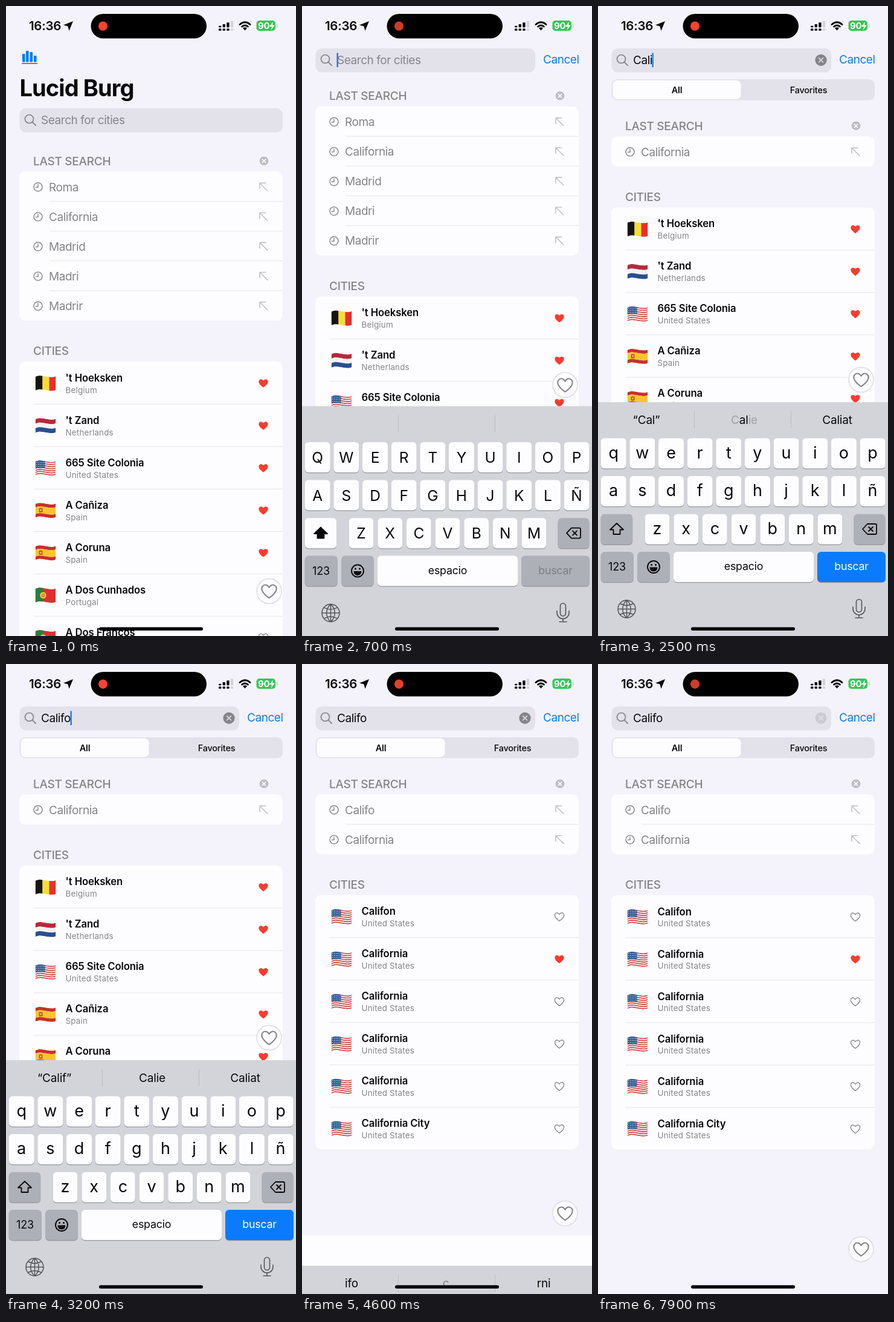
An HTML page that plays this animation: 480 px wide and 1040 px high, repeating every 8000 ms.

```html
<!DOCTYPE html>
<html lang="en">
<head>
<meta charset="utf-8">
<title>City search</title>
<style>
  html, body { margin: 0; width: 100%; height: 100%; overflow: hidden; background: #f4f3fb; }
  svg { display: block; width: 100%; height: 100%; }
  text { font-family: Inter, "Open Sans", sans-serif; white-space: pre; }
</style>
</head>
<body>
<svg viewBox="0 0 480 1040"><defs id="defs"></defs><g id="screen"></g></svg>
<script>
const INK = '#08080a', MUTED = '#858489', PAGE = '#f4f3fb', FIELD = '#e3e2eb', CARD = '#fdfdff',
  LINE = '#e6e6ea', BLUE = '#0a7bf5', RED = '#fb3b30', PALE = '#bdbcc2', BOARD = '#d3d4da', GREY = '#aeb0b8';
const HEART = 'M0 7C-9 1-8-3.5-7-4.8C-5-7.5-1.5-6.8 0-3.8C1.5-6.8 5-7.5 7-4.8C8-3.5 9 1 0 7Z';
const LOOP = 8000, STEP = 100;
const FOCUS = .37, SUBMIT = 4.2, DISMISS = 4.4;

const $ = id => document.getElementById(id);
const clamp = v => Math.max(0, Math.min(1, v));
const mix = (a, b, p) => a + (b - a) * p;
const spring = s => s <= 0 ? 0 : 1 - (1 + 18.26 * s) * Math.exp(-18.26 * s);
const smooth = v => (v = clamp(v), v * v * (3 - 2 * v));
const times = (n, f) => Array.from({ length: n }, (_, i) => f(i)).join('');

const rect = (x, y, w, h, fill, r = 0) =>
  `<rect x="${x}" y="${y}" width="${w}" height="${h}" rx="${r}" fill="${fill}"/>`;
const circle = (x, y, r, fill) => `<circle cx="${x}" cy="${y}" r="${r}" fill="${fill}"/>`;
const ring = (x, y, r, color, w, fill = 'none') =>
  `<circle cx="${x}" cy="${y}" r="${r}" fill="${fill}" stroke="${color}" stroke-width="${w}"/>`;
const shape = (d, fill) => `<path d="${d}" fill="${fill}"/>`;
const stroke = (d, color, w = 1.4, fill = 'none') =>
  `<path d="${d}" fill="${fill}" stroke="${color}" stroke-width="${w}" stroke-linecap="round" stroke-linejoin="round"/>`;
const at = (x, y, body, scale = 1) => `<g transform="translate(${x} ${y}) scale(${scale})">${body}</g>`;
const fade = (o, body) => o <= 0 ? '' : `<g opacity="${clamp(o)}">${body}</g>`;
const label = (x, y, s, size, fill = INK, weight = 400, space = 0, anchor = 'start', extra = '') =>
  `<text x="${x}" y="${y}" font-size="${size}" fill="${fill}" font-weight="${weight}" letter-spacing="${space}" text-anchor="${anchor}" ${extra}>${s}</text>`;
const body = (x, y, s, fill, extra) => label(x, y, s, 19, fill, 400, -.45, 'start', extra);
const mid = (x, y, s, size, fill = INK, weight = 400, space = -.2) =>
  label(x, y, s, size, fill, weight, space, 'middle');
const cross = (x, y, r, fill, ink) => {
  const d = r * .36;
  return at(x, y, circle(0, 0, r, fill) + stroke(`M${-d} ${-d}L${d} ${d}M${d} ${-d}L${-d} ${d}`, ink, 1.6));
};

// Waving flags, centred on 0,0
const wave = (a, b) => `M-17 ${a}C-6 ${a - 6} 5 ${a + 4} 17 ${a - 1}V${b - 1}C5 ${b + 4} -6 ${b - 6} -17 ${b}Z`;
function bands(colors, shares = colors.map(() => 1)) {
  const unit = 22.5 / shares.reduce((a, b) => a + b);
  let y = -10.5;
  return colors.map((c, i) => shape(wave(y, y += shares[i] * unit), c)).join('');
}
const flags = {
  be: rect(-17, -15, 12, 30, '#151413') + rect(-5, -15, 11, 30, '#fbdc35') + rect(6, -15, 12, 30, '#e5302f'),
  nl: bands(['#b7293a', '#f4f3f2', '#28508f']),
  us: bands(Array.from({ length: 13 }, (_, i) => i % 2 ? '#f6f1ee' : '#cf3b3a')) +
    rect(-17, -15, 16, 15, '#2f5b93') +
    times(15, i => circle(-15 + i % 5 * 3, -9.5 + Math.floor(i / 5) * 3.4, .65, '#fff')),
  es: bands(['#c8302b', '#fac52e', '#c8302b'], [1, 2, 1]) +
    rect(-11, -4, 6, 7, '#b5532b', 1.5) + rect(-9.5, -2, 3, 3, '#e5b46c'),
  pt: bands(['#dc3030']) + rect(-17, -15, 13, 30, '#2b7d3c') +
    circle(-4, 0, 5.2, '#f2d33b') + rect(-6.3, -2.8, 4.6, 5.6, '#d13a33', 1.5) + rect(-5, -1.4, 2, 2.5, '#fff')
};
$('defs').innerHTML = `<clipPath id="wave"><path d="${wave(-10.5, 12)}"/></clipPath>` +
  Object.entries(flags).map(([k, v]) => `<g id="${k}" clip-path="url(#wave)">${v}</g>`).join('');

// name, country, flag, favourite
const allCities = [
  ["'t Hoeksken", 'Belgium', 'be', 1], ["'t Zand", 'Netherlands', 'nl', 1],
  ['665 Site Colonia', 'United States', 'us', 1], ['A Cañiza', 'Spain', 'es', 1],
  ['A Coruna', 'Spain', 'es', 1], ['A Dos Cunhados', 'Portugal', 'pt', 0],
  ['A Dos Francos', 'Portugal', 'pt', 0]
];
const found = ['Califon', 'California', 'California', 'California', 'California', 'California City']
  .map((name, i) => [name, 'United States', 'us', i === 1]);

const keyTimes = [1.3, 1.6, 2, 2.4, 2.8, 3.1];
const typed = t => 'Califo'.slice(0, keyTimes.filter(k => k <= t).length);

function statusBar(t) {
  const dim = clamp(1 - Math.abs((t + 1.1) % 3.6 - 1.8) / .6);
  const signal = times(4, i => {
    const c = i < 3 ? INK : '#d4d3d9', h = 2.5 + i * 2.7, x = 352 + i * 6.6;
    return rect(x, 35.2 - h, 4.4, h, c, 1) + rect(x, 37.2, 4.4, 3.6, c, 1);
  });
  return label(38, 40, '16:36', 20.5, INK, 600, -.3) +
    shape('M111 25L104.5 41L102.5 33.5L95 31.5Z', INK) +
    rect(140.5, 13, 191.5, 40.5, '#000', 20.2) +
    circle(160.5, 33.2, 7.6, `rgb(${250 - 42 * dim},${66 - 6 * dim},${48 - 10 * dim})`) + signal +
    stroke('M387 30.5Q395.5 23 404 30.5M390.500 34Q395.5 30 400.5 34', INK, 2.8) +
    shape('M392 36.5Q395.5 34 399 36.5L395.5 40.5Z', INK) +
    rect(414.5, 24, 31.5, 17, '#35c759', 5) + rect(447.5, 29.5, 2, 6, '#b4dcc0', 1) +
    label(417, 38, '90', 15, '#fff', 700, -.3) + shape('M442 26L436 34H440L438.5 40L445 31.5H441Z', '#fff');
}

function header(t, p, text) {
  const y = mix(169, 70, p), w = mix(435.5, 363.5, p);
  const icon = [[27, 79], [33, 74], [39.5, 76], [46, 82]]
    .map(([x, top]) => rect(x, top, 4.6, 92.5 - top, BLUE, 1)).join('') + rect(26, 94, 26, 1.6, BLUE);
  const big = at(0, -107 * p, icon + label(22.5, 149, 'Lucid Burg', 38, INK, 700, -.9));
  let out = fade(1 - 2 * p, big) + rect(22.5, y, w, 39.5, FIELD, 10) +
    at(0, y, ring(38.5, 17.5, 7, MUTED, 1.7) + stroke('M43.7 22.7L49 28', MUTED, 1.8)) +
    (text ? body(58, y + 26.2, text, INK, 'id="typed"') : body(58, y + 26.2, 'Search for cities', MUTED));
  if (text) out += cross(369, 89.3, 9.6, t >= 7.8 ? '#cccbd3' : MUTED, FIELD);
  if (t >= .6 && t < 4.3) out += '<rect id="cursor" x="57.5" y="77.5" width="2.4" height="23.5" fill="#1a78f0"/>';
  return out + fade(p, body(mix(470, 399, p), 95.2, 'Cancel', BLUE));
}

function scopeBar(p) {
  return fade(p, rect(22.5, 121, 435.5, 34.5, FIELD, 9) + rect(24.5, 122.7, 212, 31, CARD, 7.5) +
    mid(130.5, 143.5, 'All', 14.5, INK, 600) + mid(348.5, 143.5, 'Favorites', 14.5, INK, 500));
}

const heading = (y, s) => label(45, y + 6.8, s, 19, MUTED, 500, -.28);

function recentRow(y, name) {
  return ring(53, y, 7, MUTED, 1.4) +
    stroke(`M53 ${y - 4.3}V${y + .5}H49.3`, MUTED) + body(71, y + 6.7, name, MUTED) +
    stroke(`M433 ${y + 6.5}L420 ${y - 6.5}M420 ${y + 3}V${y - 6.5}H430`, PALE);
}

function cityRow(y, [name, country, flag, liked], last) {
  return at(65.5, y + 36, `<use href="#${flag}"/>`) +
    label(98.5, y + 33, name, 16.7, INK, 600, -.12) +
    label(98.5, y + 51.8, country, 13.4, MUTED, 400, .2) +
    at(426, y + 36, liked ? shape(HEART, RED) : stroke(HEART, MUTED, 1.3)) +
    (last ? '' : rect(45, y + 70, 413, 1, LINE));
}

function lists(t, p, scope) {
  const y = 256 - 107.5 * p + 49.5 * scope;
  const recents = t < keyTimes[0] ? ['Roma', 'California', 'Madrid', 'Madri', 'Madrir']
    : t < SUBMIT ? ['California'] : ['Califo', 'California'];
  const count = 5 - 4 * scope + spring(t - SUBMIT);
  const top = y + 17, cityY = top + 49.1 * count + 51;
  const cities = t < 3.5 ? allCities : found;
  return heading(y, 'LAST SEARCH') + cross(427, y - .3, 7.3, PALE, CARD) +
    rect(22, top, 436, 49.1 * count + 1, CARD, 10) +
    recents.map((r, i) => fade(i ? count - i : 1, recentRow(top + 25.8 + i * 49.1, r) +
      (i ? rect(72, top + i * 49.1, 386, 1, LINE) : ''))).join('') +
    heading(cityY, 'CITIES') +
    rect(22, cityY + 17.3, 436, cities === found ? 420 : 560, CARD, 10) +
    cities.map((c, i) => cityRow(cityY + 17.3 + i * 70, c, cities === found && i === 5)).join('');
}

const fab = y => ring(435.5, y, 20.5, '#e1e0e7', 1.8, CARD) + at(435.5, y, stroke(HEART, MUTED, 1.25), 1.6);

const key = (x, y, w, fill) => rect(x, y + 1.3, w, 50, '#96979e', 6) + rect(x, y, w, 50, fill, 6);

function suggestions(t) {
  const quoted = typed(t - .2);
  if (t >= 4.5) return mid(82, 35.5, 'ifo', 19) + fade(.4, mid(238, 35.5, 'c', 19)) + mid(400, 35.5, 'rni', 19);
  let out = quoted ? mid(80, 35.5, `“${quoted}”`, 19) : '';
  if (t >= 3.4) out += mid(240, 35.5, 'Cálido', 19) + mid(400, 35.5, 'Californiana', 19);
  else if (t >= 2.4) {
    const soft = s => t < 2.6 ? `<tspan fill-opacity=".25">${s}</tspan>` : s;
    out += mid(242, 35.5, soft('C') + 'al' + soft('ie'), 19) + mid(396, 35.5, 'Caliat', 19);
  }
  return out;
}

function keyboard(t, top, text) {
  const upper = !text, size = upper ? 24.5 : 27, dark = '#53545a';
  const row = (letters, x, y, w) => [...letters].map((c, i) => key(x + i * 47.65, y, w, CARD) +
    mid(x + i * 47.65 + w / 2, y + (upper ? 34 : 33), upper ? c.toUpperCase() : c, size, INK, 400, 0)).join('');
  const letters = row('qwertyuiop', 4.7, 59.5, 42) + row('asdfghjklñ', 4.7, 122, 42) + row('zxcvbnm', 77.7, 184.7, 40.7);
  const shift = key(4.7, 184.7, 52.5, upper ? CARD : GREY) +
    stroke('M31 200L42 210.5H36.5V218H25.5V210.5H20Z', INK, 1.8, upper ? INK : 'none');
  const erase = key(423.5, 184.7, 52, GREY) +
    stroke('M446 201H459Q461 201 461 203V216Q461 218 459 218H446L438 209.5ZM448 206L455 213M455 206L448 213', INK, 1.8);
  const emoji = key(65.3, 247, 53.5, GREY) + ring(92, 272, 10, INK, 1.9) +
    circle(88.5, 268.5, 1.5, INK) + circle(95.5, 268.5, 1.5, INK) +
    shape('M85.5 272.5H98.5Q98 279.5 92 279.5Q86 279.5 85.5 272.5Z', INK);
  const globe = 'M-14.5 0A14.5 14.5 0 0 1 14.5 0A14.5 14.5 0 0 1-14.5 0ZH14.5M0-14.5V14.5' +
    'M0-14.5C-9-7-9 7 0 14.5C9 7 9-7 0-14.5M-11-9Q0-3 11-9M-11 9Q0 3 11 9';
  const mic = 'M-4.5-11A4.5 4.5 0 0 1 4.5-11V1A4.5 4.5 0 0 1-4.5 1ZM-10-3V0A10 10 0 0 0 10 0V-3M0 10V15M-6 15H6';
  return at(0, top, rect(0, 0, 480, 400, BOARD) +
    rect(159, 15, 1, 28, '#bdbec5') + rect(319, 15, 1, 28, '#bdbec5') + suggestions(t) +
    letters + shift + erase + key(4.7, 247, 54, GREY) + mid(31.5, 278, '123', 18) + emoji +
    key(125, 247, 232, CARD) + mid(241, 277, 'espacio', 17.8) +
    key(363, 247, 113, text ? '#0a7bff' : GREY) + mid(419.5, 277, 'buscar', 17.8, text ? '#fff' : '#7d7f86') +
    at(47.5, 341.5, stroke(globe, dark, 1.5)) + at(432, 341, stroke(mic, dark, 1.6)));
}

function render(t) {
  const text = typed(t), p = smooth((t - FOCUS) / .3), scope = spring(t - keyTimes[0]);
  const lift = s => spring(s - FOCUS) - spring(s - DISMISS);
  const boardY = 1040 - 386 * lift(t), fabY = mix(966, 617, lift(t - .024));
  const gap = t > DISMISS && fabY < 960 ? rect(0, fabY + 36.5, 480, 1040 - fabY, CARD) : '';
  $('screen').innerHTML = rect(0, 0, 480, 1040, PAGE) + lists(t, p, scope) + header(t, p, text) +
    scopeBar(scope) + gap + fab(fabY) + (boardY < 1039.5 ? keyboard(t, boardY, text) : '') +
    statusBar(t) + rect(154, 1025.5, 172, 5.4, '#000', 2.7);
  if (text && $('cursor')) $('cursor').setAttribute('x', 57.5 + $('typed').getComputedTextLength());
}

let shown = -1;
function tick() {
  const step = Math.floor(performance.now() % LOOP / STEP);
  if (step !== shown) render((shown = step) * STEP / 1000);
  requestAnimationFrame(tick);
}
tick();
</script>
</body>
</html>
```
